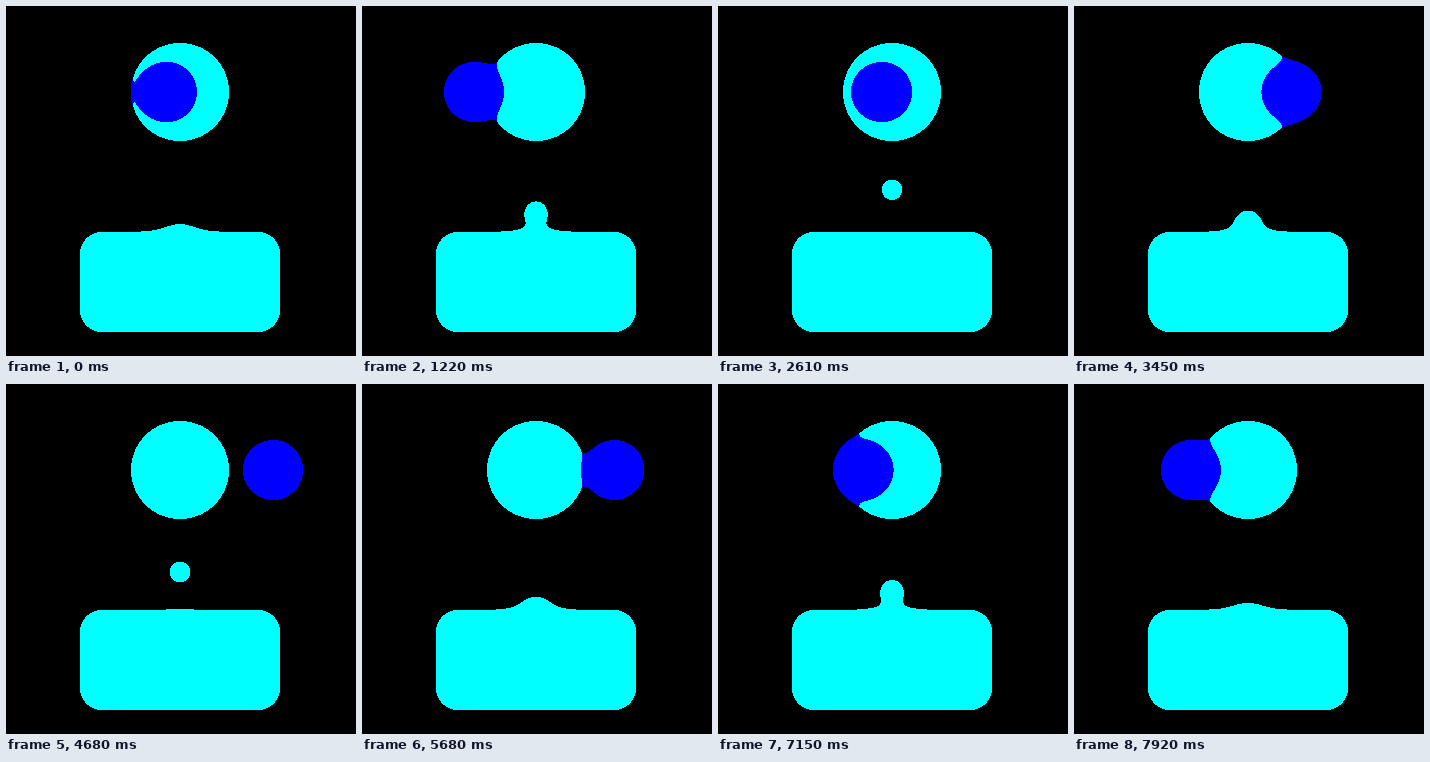
These frames come from a looping animation (350 by 350 pixels, 7990 ms). An HTML page with a canvas:

```html
<!DOCTYPE html>
<html lang="en">
<head>
<meta charset="utf-8">
<title>Distance field blending</title>
<style>
  html, body { margin: 0; width: 100%; height: 100%; overflow: hidden; background: #000; }
  canvas { display: block; width: 100vmin; height: 100vmin; image-rendering: pixelated; }
</style>
</head>
<body>
<canvas id="stage" width="350" height="350"></canvas>
<script>
const SIZE = 350, LOOP = 7990, STEPS = 104, STEP = LOOP / STEPS;
const ctx = document.getElementById('stage').getContext('2d');
const image = ctx.createImageData(SIZE, SIZE);
const pixels = new Uint32Array(image.data.buffer);
const BLACK = 0xff000000, CYAN = 0xffffff00, BLUE = 0xffff0000;

// Sideways swing of the blue disc: seconds, offset, speed
const swing = [
  [0, -13, -62], [1.22, -62, -4], [2.61, -10, 61], [3.45, 43, 58], [4.22, 79.5, 38],
  [4.68, 93, 24], [5.15, 100, 0], [6.53, 8.5, -70], [7.99, -59, -22]
];

function hermite(keys, t) {
  let i = 0;
  while (i < keys.length - 2 && t > keys[i + 1][0]) i++;
  const [t0, p0, v0] = keys[i], [t1, p1, v1] = keys[i + 1];
  const d = t1 - t0, s = (t - t0) / d, r = 1 - s;
  return p0 * r * r * (1 + 2 * s) + p1 * s * s * (3 - 2 * s) + d * s * r * (v0 * r - v1 * s);
}

const disc = (x, y, cx, cy, r) => Math.hypot(x - cx, y - cy) - r;

function roundBox(x, y, cx, cy, w, h, r) {
  const dx = Math.abs(x - cx) - w + r, dy = Math.abs(y - cy) - h + r;
  return Math.hypot(Math.max(dx, 0), Math.max(dy, 0)) + Math.min(Math.max(dx, dy), 0) - r;
}

// Exponential smooth minimum
const blend = (a, b, k) => Math.min(a, b) - k * Math.log1p(Math.exp(-Math.abs(a - b) / k));

function topColor(x, y, blueX) {
  const big = disc(x, y, 174, 86, 49);
  const small = disc(x, y, blueX, 86, 30);
  // the blue edge swells where it crosses the big rim
  if (small < 6.9 * Math.exp(-Math.abs(big) / 4.5)) return BLUE;
  return big < 0 ? CYAN : BLACK;
}

function bottomColor(x, y, dropY) {
  const box = roundBox(x, y, 174, 276, 100, 50, 22);
  const drop = disc(x, y, 174, dropY, 10);
  return blend(box, drop, 10) < 0 ? CYAN : BLACK;
}

function draw(n) {
  const blueX = 174 + hermite(swing, n * STEP / 1000);
  const fall = (n - 5.1) / 25.6;
  const dropY = 174 + 75 * (fall - Math.floor(fall));
  for (let y = 0, i = 0; y < SIZE; y++) {
    for (let x = 0; x < SIZE; x++, i++) {
      pixels[i] = y < 150
        ? topColor(x + 0.5, y + 0.5, blueX)
        : bottomColor(x + 0.5, y + 0.5, dropY);
    }
  }
  ctx.putImageData(image, 0, 0);
}

const start = performance.now();
let shown = -1;

function tick() {
  const t = (performance.now() - start) % LOOP;
  const n = Math.min(STEPS - 1, Math.floor((t + 9) / STEP));
  if (n !== shown) draw(shown = n);
  requestAnimationFrame(tick);
}
tick();
</script>
</body>
</html>
```
